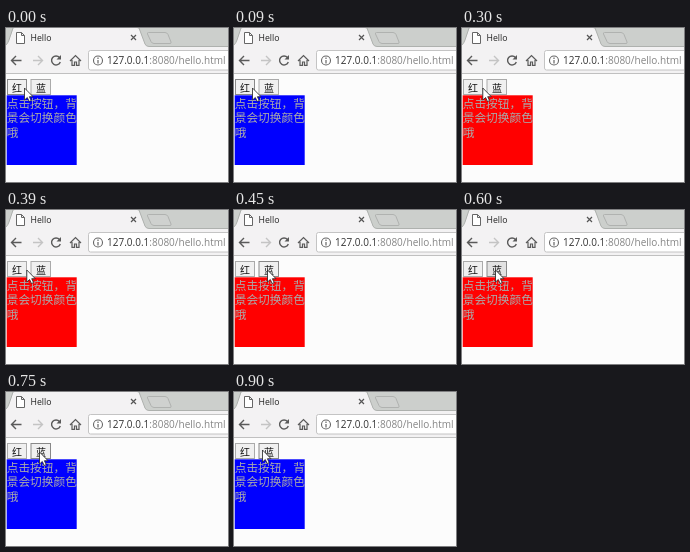
Write an HTML page that moves like this. It is 222 px wide and 154 px high and loops after 1.05 s.

```html
<!DOCTYPE html>
<html lang="zh-CN">
<head>
<meta charset="utf-8">
<title>Hello</title>
<style>
  html, body { margin: 0; width: 100%; height: 100%; overflow: hidden; background: #fcfcfc; }
  svg { display: block; width: 222px; height: 154px; }
  .latin { font-family: "Open Sans", "Noto Sans", sans-serif; }
  .cjk { font-family: "Noto Sans CJK SC", "Noto Sans CJK", sans-serif; }
  .icon { fill: none; stroke: #5a5a5a; stroke-width: 1.4; }
</style>
</head>
<body>
<svg viewBox="0 0 222 154">
  <!-- Tab strip -->
  <rect width="222" height="19" fill="#cccfcc"/>
  <path d="M0 19V17Q2 15 3 12L7 1Q7.500 0 9 0H131Q133 0 134 3L139 16Q140 18.500 143 18.500V19Z" fill="#f3f2f3"/>
  <path d="M0 17Q2 15 3 12L7 0M133 0L139 16Q140 18.500 143 18.500H222" fill="none" stroke="#aeb1ae"/>
  <path d="M142.500 4.500H159Q161 4.500 162 6.500L165 14Q165.500 15.500 164 15.500H148Q146 15.500 145 13.500L141.500 6Q141 4.500 142.500 4.500Z" fill="#cfd1cf" stroke="#b0b2b0"/>
  <path d="M10.500 4.500H15.500L18.500 7.500V15.500H10.500ZM15.500 4.500V7.500H18.500" fill="#fff" stroke="#666"/>
  <text class="latin" x="24.500" y="13" font-size="8.700" fill="#222">Hello</text>
  <path d="M125 7L130 12M130 7L125 12" stroke="#555" stroke-width="1.200"/>

  <!-- Toolbar -->
  <rect y="19" width="222" height="27" fill="#f3f2f3"/>
  <path d="M0 45.500H222" stroke="#c0c0c0"/>
  <g class="icon">
    <path d="M15.500 32.500H6M10 28L5.500 32.500L10 37"/>
    <path d="M27 32.500H36M32 28L36.500 32.500L32 37" stroke="#c4c4c4"/>
    <path d="M53.500 29.500A4.500 4.500 0 1 0 54.300 34"/>
    <path d="M64 33L69.500 27.500L75 33M66 32V37.300H68.500V34H70.500V37.300H73V32" stroke-width="1.200"/>
  </g>
  <path d="M55 27V31.500H50.500Z" fill="#5a5a5a"/>
  <path d="M222 22.500H84.500Q82.500 22.500 82.500 24.500V40Q82.500 42 84.500 42H222" fill="#fff" stroke="#c4c4c4"/>
  <circle cx="92" cy="32.500" r="4.500" fill="none" stroke="#666" stroke-width="1.100"/>
  <path d="M92 29.500V31M92 32V35.500" stroke="#666" stroke-width="1.200"/>
  <text class="latin" x="101" y="36" font-size="10" fill="#333">127.0.0.1<tspan fill="#858585">:8080/hello.html</tspan></text>

  <!-- Page -->
  <g class="cjk" font-size="10" fill="#111">
    <rect class="button" x="1.500" y="51.500" width="19" height="15"/>
    <text x="6" y="63.500">红</text>
    <rect class="button" x="25" y="51.500" width="19.500" height="15"/>
    <text x="30" y="63.500">蓝</text>
  </g>
  <rect id="panel" x="0.700" y="67.300" width="70" height="69.700"/>
  <g class="cjk" font-size="11.700" fill="#aaa">
    <text x="0.700" y="79.500">点击按钮，背</text>
    <text x="0.700" y="94">景会切换颜色</text>
    <text x="0.700" y="108.500">哦</text>
  </g>
  <path id="cursor" d="M0 0V12L2.800 9.500L4.700 13.500L6.700 12.600L4.900 8.700H8.500Z" fill="#fff" stroke="#222" stroke-width="0.800"/>
</svg>
<script>
  const STEP = 150;
  const BLUE = "#00f", RED = "#f00";
  // Pointer tip, panel colour, hovered button and whether it is held down.
  const poses = [
    { x: 18.5, y: 60, color: BLUE, hover: 0 },
    { x: 18.5, y: 60, color: BLUE, hover: 0, pressed: true },
    { x: 20.8, y: 60, color: RED },
    { x: 33.5, y: 60, color: RED, hover: 1 },
    { x: 33.5, y: 60, color: RED, hover: 1, pressed: true },
    { x: 33.5, y: 60, color: BLUE, hover: 1 },
    { x: 28.5, y: 58, color: BLUE, hover: 1 }
  ];
  const panel = document.getElementById("panel");
  const cursor = document.getElementById("cursor");
  const buttons = document.querySelectorAll(".button");

  function draw() {
    const pose = poses[Math.floor(performance.now() / STEP) % poses.length];
    panel.setAttribute("fill", pose.color);
    cursor.setAttribute("transform", `translate(${pose.x} ${pose.y})`);
    buttons.forEach((button, i) => {
      const hovered = i === pose.hover;
      button.setAttribute("fill", hovered && pose.pressed ? "#e2e2e2" : "#f0f0f0");
      button.setAttribute("stroke", hovered ? "#888" : "#aaa");
    });
    requestAnimationFrame(draw);
  }
  draw();
</script>
</body>
</html>
```
